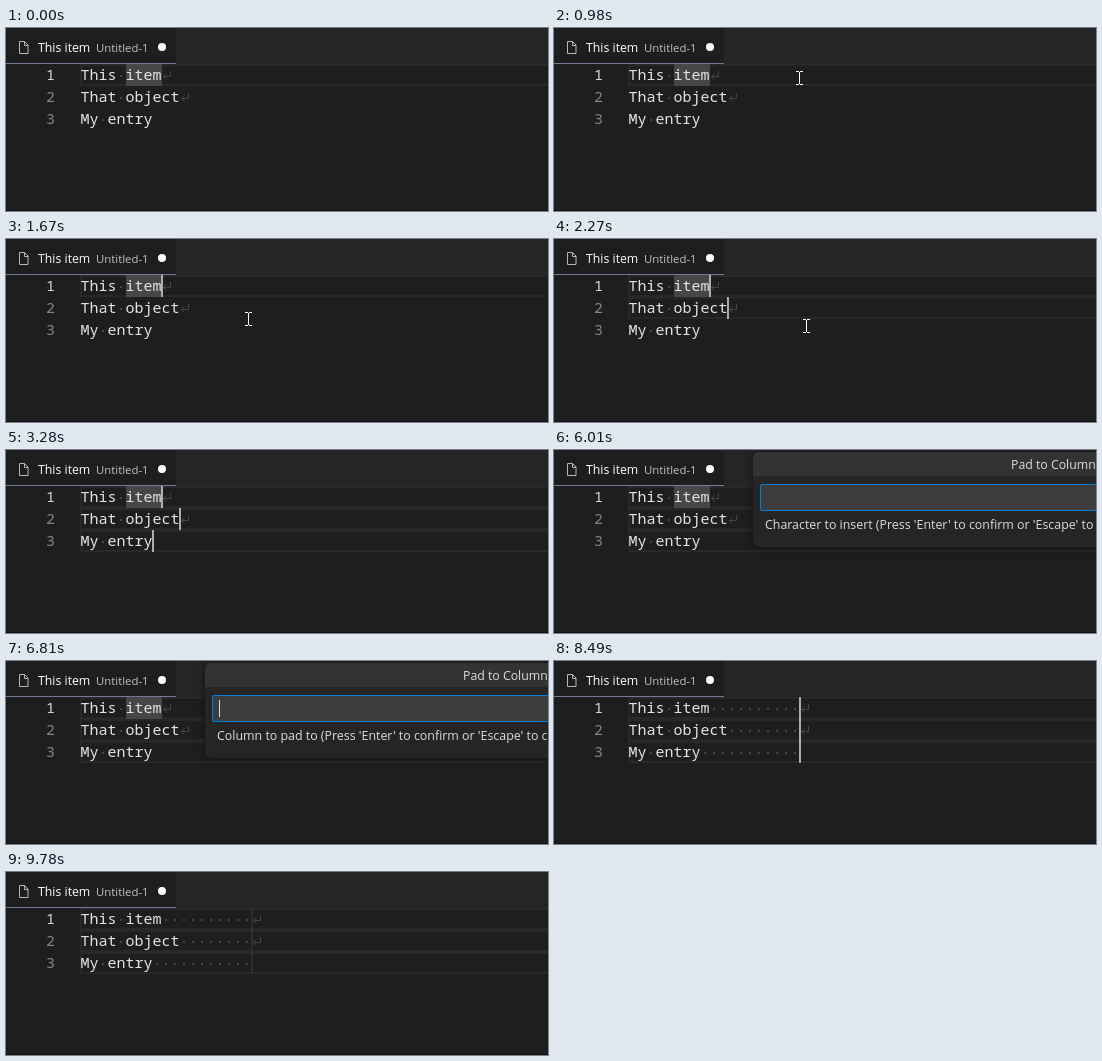
Recreate the animation shown at these times as an HTML page with a canvas. Size 542 px wide and 183 px high, loop 9.9 s.

```html
<!DOCTYPE html>
<html lang="en">
<head>
<meta charset="utf-8">
<title>Pad to column</title>
<style>
  html, body { margin: 0; height: 100%; overflow: hidden; background: #1e1e1e; }
  canvas { display: block; }
</style>
</head>
<body>
<canvas id="stage" width="542" height="183"></canvas>
<script>
const ctx = document.getElementById('stage').getContext('2d');
const LOOP = 9900, LEFT = 74, TOP = 36, CELL = 9, ROW = 22;
const PADDED = 8490, PAD_WIDTH = 19;
const lines = ['This item', 'That object', 'My entry'];
const commands = [
  'Pad to Column: Pad lines', 'Pad to Column: Pad lines with default values',
  'Tasks: Run Build Task', 'Trim Trailing Whitespace',
  'Convert Indentation to Tabs', 'Sort Lines Ascending'
];
const hint = " (Press 'Enter' to confirm or 'Escape' to cancel)";

// Editor carets: time shown, how many, optional later start of the blinking
const carets = [[1100, 1], [2130, 2], [3140, 3], [6560, 3], [PADDED, 3, 9020]];

// Pointer path: time, x, y
const pointer = [
  [80, 359, 169], [250, 359, 169], [610, 245, 50], [980, 245, 50],
  [1100, 253, 54], [1310, 254, 54], [1670, 242, 80], [1950, 249, 72],
  [2130, 250, 72], [2270, 252, 87], [3140, 252, 87], [3280, 490, 148]
];

const between = (t, a, b) => t >= a && t < b;
const clamp = x => Math.min(1, Math.max(0, x));
const ease = x => x * x * (3 - 2 * x);

function box(x, y, w, h, color, radius = 0) {
  ctx.fillStyle = color;
  ctx.beginPath();
  ctx.roundRect(x, y, w, h, radius);
  ctx.fill();
}

function path(d, color) {
  ctx.strokeStyle = color;
  ctx.lineWidth = 1;
  ctx.stroke(new Path2D(d));
}

function label(text, x, y, color = '#ddd', size = 12.3) {
  ctx.font = `${size}px "Open Sans", sans-serif`;
  ctx.fillStyle = color;
  ctx.fillText(text, x, y);
}

function drawTab() {
  box(0, 0, 542, 36, '#252526');
  box(0, 0, 170, 36, '#1e1e1e');
  box(0, 35, 170, 1, '#737b9a');
  path('M13.5 13.5h5l3.5 3.5v8.5h-8.5zM18.5 13.5v4h3.5', '#b8b8b8');
  label('This item', 32, 24, '#fff');
  label('Untitled-1', 90, 24, '#c0c0c0', 11.4);
  box(152, 15, 8, 8, '#fff', 4);
}

function caretAlpha(t, start) {
  const phase = Math.max(0, Math.min(t, 9780) - start - 500) % 1000;
  const folded = phase > 500 ? 1000 - phase : phase;
  return 1 - ease(clamp((folded - 100) / 200));
}

function drawEditor(t, focused) {
  const [shown, count, start = shown] = carets.filter(c => c[0] <= t).pop() || [0, 0];
  const padded = t >= PADDED;
  lines.forEach((line, i) => {
    const y = TOP + i * ROW, base = y + 16;
    const text = padded ? line.padEnd(PAD_WIDTH) : line;
    const end = LEFT + text.length * CELL;
    if (i < Math.max(1, count)) {
      ctx.lineWidth = 2;
      ctx.strokeStyle = '#282828';
      ctx.strokeRect(LEFT + 1, y + 1, 500, ROW - 2);
    }
    if (!i && !padded) box(120, y, 36, ROW, '#474747');

    ctx.font = '15px "Noto Sans Mono", monospace';
    ctx.fillStyle = i ? '#858585' : '#d8d8d8';
    ctx.fillText(i + 1, 40, base);
    ctx.fillStyle = '#e4e4e4';
    ctx.fillText(text, LEFT + .5, base);
    [...text].forEach((ch, k) => {
      if (ch === ' ') box(LEFT + k * CELL + 4, y + 11, 2, 2, '#454545');
    });
    if (i < 2) path(`M${end + 9.5} ${y + 7}v5.5h-7m3 -3l-3 3l3 3`, '#454545');

    if (focused && i < count) {
      ctx.globalAlpha = caretAlpha(t, start);
      box(end, y, 2, ROW, '#aeafad');
      ctx.globalAlpha = 1;
    }
  });
  box(0, 182, 542, 1, '#121212');
}

function drawPanel(height) {
  ctx.shadowColor = 'rgba(0,0,0,.5)';
  ctx.shadowBlur = 9;
  box(199, 2, 400, height, '#252526', 6);
  ctx.shadowBlur = 0;
}

function drawInput(y) {
  box(206, y, 400, 27, '#007fd4', 2);
  box(207, y + 1, 400, 25, '#3c3c3c', 1);
}

function drawPalette(t) {
  drawPanel(230);
  drawInput(10);
  label('>', 214, 28);
  if (!between(t, 3780, 4320)) box(221, 15, 1, 17, '#ddd');
  box(206, 46, 400, ROW, '#04395e', 3);
  commands.forEach((name, i) => label(name, 216, 61 + i * ROW, i ? '#e2e2e2' : '#3a72d4'));
}

function drawPrompt(message, value, caretX) {
  drawPanel(95);
  box(199, 2, 400, 24, '#333334', [6, 6, 0, 0]);
  label('Pad to Column', 457, 19);
  drawInput(34);
  label(value, 213, 52);
  if (caretX) box(caretX, 39, 1, 17, '#ddd');
  label(message + hint, 211, 79, '#ddd', 12.4);
}

function drawPointer(t) {
  const i = pointer.findIndex(p => p[0] > t);
  if (i < 1) return;
  const [a, b] = [pointer[i - 1], pointer[i]];
  const k = ease((t - a[0]) / (b[0] - a[0]));
  const x = Math.round(a[1] + (b[1] - a[1]) * k);
  const y = Math.round(a[2] + (b[2] - a[2]) * k);
  box(x, y - 6, 1, 12, '#fff');
  for (const edge of [y - 7, y + 6]) {
    box(x - 3, edge, 3, 1, '#fff');
    box(x + 1, edge, 3, 1, '#fff');
  }
}

function draw(t) {
  const palette = between(t, 3740, 4830);
  const charPrompt = between(t, 4830, 6560);
  const columnPrompt = between(t, 6810, PADDED);
  box(0, 0, 542, 183, '#1e1e1e');
  drawTab();
  drawEditor(t, !(palette || charPrompt || columnPrompt));
  if (palette) drawPalette(t);
  if (charPrompt) {
    drawPrompt('Character to insert', t < 5800 ? '' : ' ',
      t < 5250 ? 213 : between(t, 5800, 6010) ? 216 : 0);
  }
  if (columnPrompt) {
    const value = t < 7900 ? '' : t < 8320 ? '2' : '20';
    const hidden = between(t, 6850, 7350);
    drawPrompt('Column to pad to', value, hidden ? 0 : 213 + 7 * value.length);
  }
  drawPointer(t);
}

function tick() {
  draw(performance.now() % LOOP);
  requestAnimationFrame(tick);
}
tick();
</script>
</body>
</html>
```
